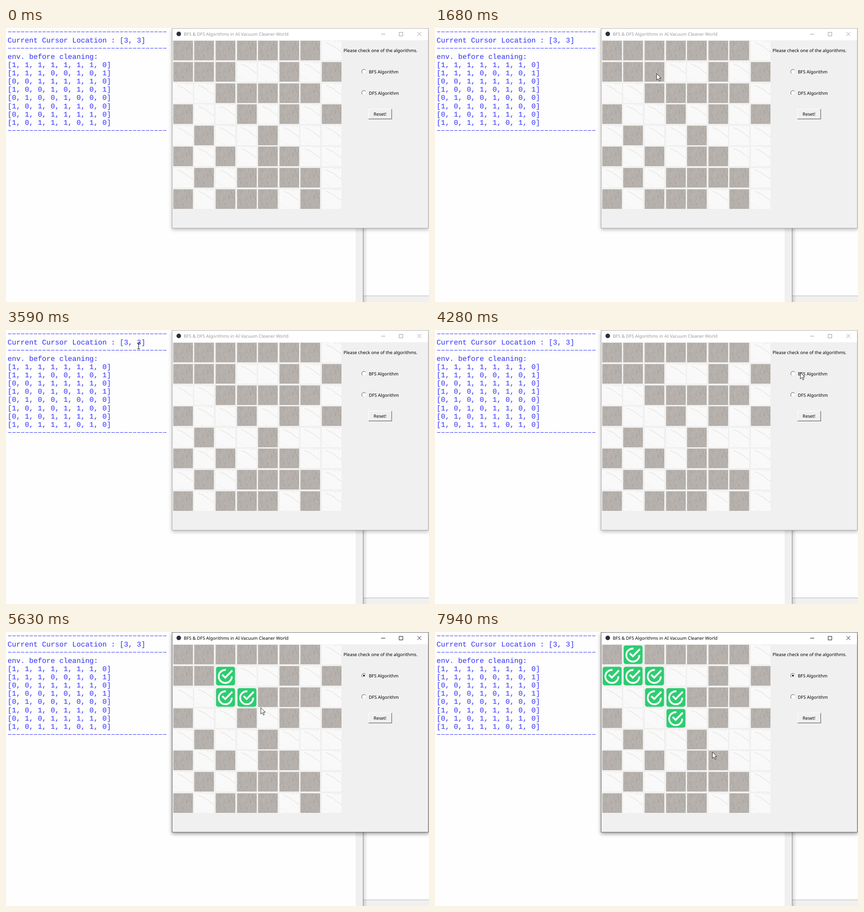
These frames come from a looping animation (928 px wide and 603 px high, 8000 ms). An HTML page:

```html
<!DOCTYPE html>
<html lang="en">
<head>
<meta charset="utf-8">
<title>Vacuum Cleaner World</title>
<style>
html, body { margin: 0; width: 100%; height: 100%; overflow: hidden; background: #fff; }
svg { display: block; width: 100vw; height: 100vh; }
text { white-space: pre; text-rendering: geometricPrecision; }
.log { font: 15.75px "Liberation Mono", monospace; fill: #00f; fill-opacity: .82; }
.ui { font: 9.75px "Noto Sans", "Open Sans", sans-serif; fill: #000; }
</style>
</head>
<body>
<svg id="stage" viewBox="0 0 928 603" xmlns="http://www.w3.org/2000/svg">
  <defs>
    <filter id="soft" x="-10%" y="-10%" width="120%" height="120%"><feGaussianBlur stdDeviation="4"/></filter>
    <linearGradient id="fade"><stop stop-opacity=".14"/><stop offset="1" stop-opacity="0"/></linearGradient>
    <clipPath id="cell"><rect width="43" height="43"/></clipPath>
    <g id="dirty" clip-path="url(#cell)"><rect width="43" height="43" fill="#b6b1ac"/></g>
    <g id="clean" clip-path="url(#cell)" fill="none">
      <rect width="43" height="43" fill="#f9f9f9"/>
      <path d="M9 4C17 8 22 9 28 14S37 21 43 25" stroke="#e2d9cc"/>
      <path d="M0 33C8 34 13 38 21 43" stroke="#f0ede9" stroke-width=".7"/>
      <path d="M27 2L42 1" stroke="#e6e1da" stroke-width=".8" stroke-dasharray="5 3"/>
    </g>
    <g id="done">
      <rect width="43" height="43" fill="#f3f6f4"/>
      <rect x=".8" y="1.4" width="41.6" height="41" rx="4.5" fill="#2ecc71"/>
      <g fill="none" stroke="#f4fbf7" stroke-width="4">
        <path d="M22.5 8.6A14.3 14.3 0 1 0 35.3 22.6"/>
        <path d="M14.3 19L21 25.5L36.5 9.5"/>
      </g>
    </g>
  </defs>

  <rect width="928" height="603" fill="#fefefe"/>
  <rect x="767" width="16" height="603" fill="#f0f0f0"/>
  <rect x="784" y="590" width="144" height="13" fill="#f0f0f0"/>
  <path d="M784 589.5H928" stroke="#b4b4b4"/>
  <rect x="784" width="9" height="603" fill="url(#fade)"/>
  <path d="M783.5 0V603" stroke="#858585"/>
  <g id="log"></g>

  <rect id="shadow" x="364" y="4" width="564" height="440" filter="url(#soft)"/>
  <rect x="365" width="562" height="441" fill="#f0f0f0"/>
  <rect x="365" width="562" height="27" fill="#fff"/>
  <rect id="frame" x="364.5" y=".5" width="562" height="440" fill="none"/>
  <circle cx="379" cy="13" r="5" fill="#2b303c"/>
  <text id="title" class="ui" x="390" y="17.2">BFS &amp; DFS Algorithms in AI Vacuum Cleaner World</text>
  <path id="buttons" d="M823 13.5H832M862.5 9.5H870.5V17.5H862.5ZM902.5 9L911 17.5M911 9L902.5 17.5" fill="none"/>

  <g id="board"></g>

  <text class="ui" x="740.5" y="53.3">Please check one of the algorithms.</text>
  <g id="radios"></g>
  <rect x="795" y="178" width="52" height="23" fill="#7c7c7c"/>
  <rect x="795" y="178" width="51" height="22" fill="#fff"/>
  <rect x="796" y="179" width="50" height="21" fill="#b4b4b4"/>
  <rect x="796" y="179" width="49" height="20" fill="#f0f0f0"/>
  <text class="ui" x="820.5" y="193" text-anchor="middle">Reset!</text>

  <path id="arrow" d="M.5 .5V14.6L3.8 11.5L6.2 16.8L8.4 15.8L6.1 10.6H10.3Z" fill="#fff" stroke="#111" stroke-width=".9"/>
  <path id="beam" d="M-3 -6.5H3M0 -6V6M-3 6.5H3" fill="none" stroke="#111" stroke-width="1.1"/>
</svg>
<script>
const LOOP = 8000, FOCUS = 4510, PICK = 4610, CLEAN_EVERY = 507, SAMPLE = 78;
const $ = id => document.getElementById(id);

function add(parent, tag, attrs, text) {
  const el = document.createElementNS("http://www.w3.org/2000/svg", tag);
  for (const k in attrs) el.setAttribute(k, attrs[k]);
  if (text) el.textContent = text;
  return parent.appendChild(el);
}

function random(seed) {
  return () => (seed = seed * 16807 % 2147483647) / 2147483647;
}

const world = ["11111110", "11100101", "00111110", "10010101",
               "01001000", "10101100", "01011110", "10111010"];

// Console output; null is a dashed rule
const lines = [null, "Current Cursor Location : [3, 3]", null, "env. before cleaning:",
  ...world.map(row => "[" + [...row].join(", ") + "]"), null];
lines.forEach((line, i) => {
  const y = 13.4 + i * 18.13;
  if (line) add($("log"), "text", { class: "log", x: 3.5, y: Math.round(y) }, line);
  else add($("log"), "path", {
    d: `M4.5 ${Math.floor(y - 5.1) + .5}H354`, stroke: "#00f", "stroke-opacity": .82, "stroke-dasharray": "7.2 2.25"
  });
});

// Concrete texture: short, nearly vertical streaks
const rnd = random(77);
for (let i = 0; i < 110; i++) {
  const x = rnd() * 43, y = rnd() * 43;
  add($("dirty"), "path", {
    d: `M${x} ${y}l${rnd() * 2 - 1} ${2 + rnd() * 7}`,
    stroke: rnd() < .55 ? "#958f89" : "#cbc7c2",
    "stroke-width": .7 + rnd() * 1.3, opacity: .12 + rnd() * .2
  });
}

function tile(kind, col, row) {
  const x = Math.round(366.7 + 46.6 * col), y = Math.round(28.4 + 46.6 * row);
  return add($("board"), "use", { href: "#" + kind, transform: `translate(${x} ${y})` });
}
world.forEach((row, r) => [...row].forEach((v, c) => tile(v === "1" ? "dirty" : "clean", c, r)));

// Cells in cleaning order, each as column and row
const cleaned = "22 32 21 33 11 01 10".split(" ").map(([c, r]) => tile("done", c, r));

function radio(name, y) {
  const g = add($("radios"), "g", { transform: `translate(785.3 ${y})` });
  add(g, "circle", { r: 4.8, fill: "#fff", stroke: "#e3e3e3", "stroke-width": .8 });
  add(g, "path", { d: "M-3.4 3.4A4.8 4.8 0 0 1 3.4 -3.4", fill: "none", stroke: "#777", "stroke-width": 1.2 });
  add($("radios"), "text", { class: "ui", x: 796, y: y + 4.3 }, name);
  return g;
}
const dot = add(radio("BFS Algorithm", 96), "circle", { r: 1.9, fill: "#000" });
radio("DFS Algorithm", 142.5);

// Pointer strokes: start time, end time, bend point, end point
const entry = [521, -4];
const strokes = [
  [430, 500, [532, -4], [542, -4]],
  [990, 1750, [649, 48], [406, 130]],
  [1840, 2630, [-115, 5], [144, 31]],
  [2710, 3500, [-190, -12], [291, 35]],
  [3730, 4280, [930, 95], [801, 93]],
  [4920, 5230, [680, 180], [558.5, 166]],
  [5780, 5930, [610, 167], [573.5, 176]],
  [6650, 6940, [580, 175], [588, 172]],
  [7660, 7940, [592, 210], [608, 263.5]]
];

// Each stroke is an accelerating curve seen in hard steps
function pointer(t) {
  const i = strokes.findLastIndex(s => s[0] <= t);
  if (i < 0) return null;
  const [from, to, bend, end] = strokes[i];
  const start = i ? strokes[i - 1][3] : entry;
  const steps = Math.round((to - from) / SAMPLE);
  const u = Math.min(1, Math.floor((t - from) / (to - from) * steps + .13) / steps) ** 2;
  return start.map((a, k) => (1 - u) ** 2 * a + 2 * u * (1 - u) * bend[k] + u * u * end[k]);
}

function show(el, on) { el.setAttribute("visibility", on ? "visible" : "hidden"); }

function draw(t) {
  const active = t >= FOCUS;
  $("title").style.fill = active ? "#000" : "#999";
  $("buttons").setAttribute("stroke", active ? "#111" : "#999");
  $("frame").setAttribute("stroke", active ? "#666" : "#aaa");
  $("shadow").setAttribute("opacity", active ? .42 : .26);
  show(dot, t >= PICK);
  cleaned.forEach((el, i) => show(el, t >= PICK + i * CLEAN_EVERY));

  const p = pointer(t), overText = p && p[0] < 364;
  show($("beam"), p && overText);
  show($("arrow"), p && !overText);
  if (p) $(overText ? "beam" : "arrow").setAttribute("transform", `translate(${p})`);
}

const began = performance.now();
function tick() {
  draw((performance.now() - began) % LOOP);
  requestAnimationFrame(tick);
}
tick();
</script>
</body>
</html>
```
